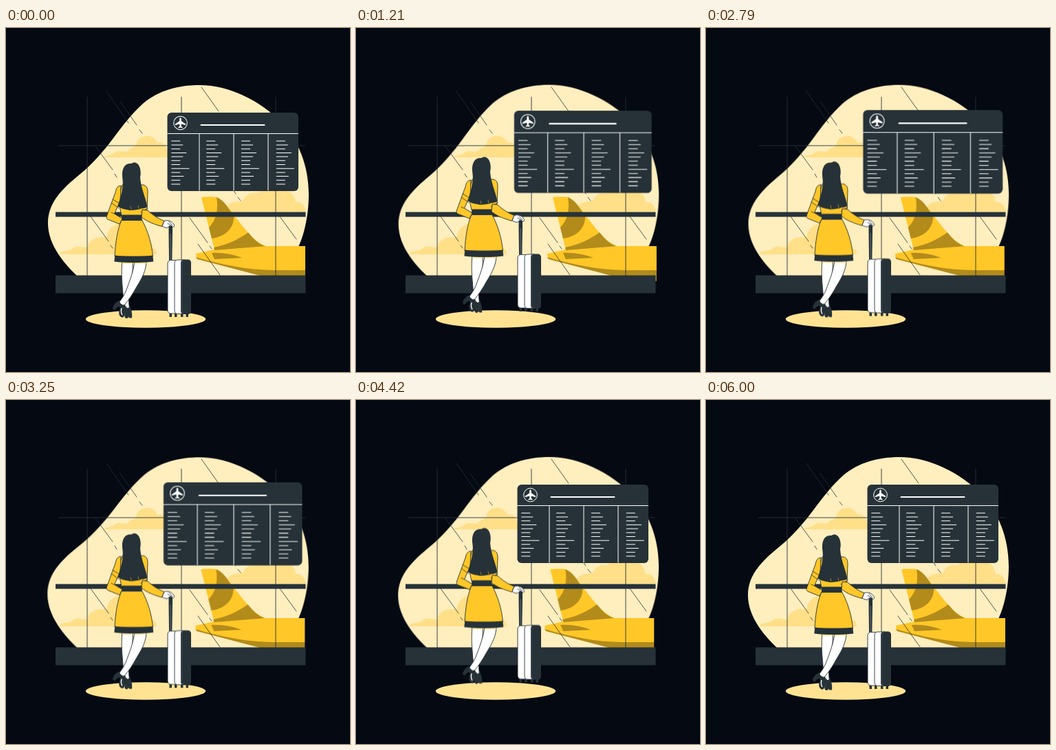
Recreate the animation shown at these times as an HTML page. Size 500 by 500 pixels, loop 6040 ms.

```html
<!DOCTYPE html>
<html lang="en">
<head>
<meta charset="utf-8">
<title>Airport hall</title>
<style>
  html, body { margin: 0; width: 100%; height: 100%; overflow: hidden; background: #050912; }
  svg { display: block; width: 100vw; height: 100vh; }

  .dark { fill: #263238; }
  .gold { fill: #ffc727; }
  .deep { fill: #b28b1b; }
  .cream { fill: #ffeebe; }
  .cloud { fill: #ffdf88; }
  .white { fill: #fff; }
  .line { fill: none; stroke: #263238; stroke-width: 1; }
  .thin { fill: none; stroke: #263238; stroke-width: .8; stroke-linecap: round; stroke-linejoin: round; }
  .edge { stroke: #263238; stroke-width: .9; stroke-linejoin: round; }
  .chalk { fill: none; stroke: #fff; }

  .blob, .plane, .board, .float { animation: 6.04s linear infinite; }
  .blob { animation-name: sway; transform-origin: 250px 225px; }
  .plane { animation-name: shake; }
  .board { animation-name: beat; transform-origin: 329.8px 180px; }
  .float { animation-name: bob; }

  /* 6 s of motion, then a 40 ms rest at the end of the loop */
  @keyframes sway {
    0%, 99.338%, 100% { transform: rotate(0deg); }
    6.209%, 31.043%, 55.877%, 80.712% { transform: rotate(1deg); }
    18.626%, 43.46%, 68.295%, 93.129% { transform: rotate(-1deg); }
  }
  @keyframes shake {
    0%, 99.338%, 100% { transform: translateX(0); }
    9.934%, 89.404% { transform: translateX(-1px); }
    19.868%, 79.47% { transform: translateX(2px); }
    29.801%, 49.669%, 69.536% { transform: translateX(-4px); }
    39.735%, 59.603% { transform: translateX(4px); }
  }
  @keyframes beat {
    0%, 29.801%, 39.735%, 59.603%, 100% { transform: scale(1); }
    9.934%, 49.669% { transform: scale(1.1); }
  }
  @keyframes bob {
    0%, 49.669%, 99.338%, 100% { transform: translateY(0); }
    24.834%, 74.503% { transform: translateY(-10px); }
  }
</style>
</head>
<body>
<svg viewBox="0 0 500 500">
  <path class="blob cream" d="M112 368C85 345 61 315 61 284C61 252 84 232 107 213C150 178 165 140 200 109C222 91 250 83 281 83C325 83 370 106 400 137C425 163 440 200 440 242C440 275 432 305 424 320C418 338 405 355 395 368Z"/>

  <g class="cloud">
    <path d="M141 188C149 183 153 186 158 181C164 176 171 181 177 179C181 172 188 176 190 167C194 154 215 153 220 167C228 164 234 170 236 188Z"/>
    <path d="M77 329C82 321 90 326 96 321C104 314 111 320 118 319C121 305 136 302 146 305C148 291 157 284 170 284C186 284 196 292 198 306C208 305 212 312 213 320C218 321 219 325 219 329Z"/>
    <path d="M310 267C312 260 320 263 325 256C331 251 339 254 345 250C349 240 359 239 366 240C372 233 390 232 398 238C408 233 419 239 421 253C430 252 434 258 436 267Z"/>
  </g>

  <g class="plane">
    <path class="gold" d="M284 246C292 245 300 245 307 246C318 251 326 266 336 278C348 293 360 310 377 317H435V368H400L277 335L276 328L303 322Z"/>
    <path class="deep" d="M306 246C318 251 323 262 331 273C332 290 320 303 299 306L295 290C306 279 309 262 306 246Z"/>
    <path class="deep" d="M352 297C360 307 367 314 377 317L303 323L302 319C322 315 339 307 352 297Z"/>
    <path class="deep" d="M276 333C310 343 350 352 390 352H435V368H400L278 336Z"/>
    <path class="deep" d="M299 327C314 326 330 329 343 334L303 336Z"/>
  </g>

  <path class="line" stroke-opacity=".9" d="M118 100V360M255 100V360M392 100V360M76 171H435"/>
  <path class="thin" d="M146 92L178 138M166 107L190 141M194 148L198 153M130 172L155 206M158 212L161 217M284 86L309 121M308 204L334 241M337 246L341 251M123 274L149 310M152 316L155 320M267 276L293 312M296 317L299 321M279 314L311 359M398 274L422 307"/>
  <path class="dark" d="M72 267.5H435.5V274.5H72ZM72 359.5H435.5V385.5H72Z"/>

  <g class="board">
    <rect class="dark" x="234.5" y="123" width="190.5" height="114" rx="6"/>
    <path class="chalk" d="M234.5 153.5H425M281 153.5V236.5M331 153.5V236.5M381 153.5V236.5"/>
    <path class="chalk" stroke-width="2" stroke-linecap="round" d="M283.5 141H375.5"/>
    <circle class="chalk" cx="253.5" cy="138" r="9.8"/>
    <path class="white" transform="translate(253.5 138)" d="M0 -8C1.5 -7 1.4 -5 1.4 -2.8L7.5 1.5V3.2L1.4 1.6L1 4.8L3 6.3V7.5L0 6.7L-3 7.5V6.3L-1 4.8L-1.4 1.6L-7.5 3.2V1.5L-1.4 -2.8C-1.4 -5 -1.5 -7 0 -8Z"/>
    <path id="rows" class="chalk"/>
  </g>

  <ellipse cx="203" cy="423" rx="87.2" ry="12.7" fill="#ffe393"/>

  <g class="float">
    <!-- suitcase -->
    <path class="dark" d="M236.5 288H242V298L241.3 338H237L236.5 298Z"/>
    <path d="M239.2 299V337" stroke="#7b858a" stroke-width=".8"/>
    <path class="dark" d="M237.5 413h3.5v7h-3.5zM245 413h3.5v7h-3.5zM254 413h3.5v7h-3.5zM261.5 413h3.5v7h-3.5z"/>
    <rect class="white edge" x="235" y="337.5" width="16" height="77.5" rx="4.5"/>
    <rect class="white edge" x="245" y="337" width="18" height="78.5" rx="4.5"/>
    <rect class="dark" x="254" y="336.5" width="15" height="79.5" rx="4.5"/>
    <path d="M258 337C255.5 339 255 341 255 345V408C255 412 256 414 258 415.5" fill="none" stroke="#6d777c" stroke-width=".5"/>

    <!-- legs and shoes -->
    <path class="white edge" d="M169 338C167 358 169 372 170 386C171 396 173 402 174 409L180 410C178 400 178 390 180 378C183 364 185 352 184 338Z"/>
    <path class="white edge" d="M187 338C186 352 179 370 174 383C171 390 168 394 164 399L171 404C178 396 184 387 190 376C198 363 204 352 204 338Z"/>
    <path d="M169 341.8H184M187 341.8H203.5" stroke="#ffe393" stroke-width="2"/>
    <path class="dark" d="M165 396C159 398 155 404 155 408L158 410C161 406 164 404 166 406C164 412 163 417 167 420C170 422 173 419 173 414C174 408 173 404 171 402C168 404 166 401 165 396Z"/>
    <path class="dark" d="M174 404C174 411 171 417 173 421C175 423 177 422 178 420L179.5 421.5H183C184 415 182 409 180 404C178 408 176 408 174 404Z"/>
    <path d="M168 407C167 411 167 414 169 417" fill="none" stroke="#fff" stroke-width="1.4"/>

    <!-- dress -->
    <path class="gold edge" d="M169 228H200C205 230 206 233 206 239L205 264L197 273H168L163 248Z"/>
    <path class="gold edge" d="M168 279H197.5C206 294 212 314 213.5 332H158C159 312 162 293 168 279Z"/>
    <path class="dark" d="M158.3 330.5C176 332.5 196 332.5 213.3 330.5L214.3 339.5C196 341.5 175 341.5 157.3 339.5Z"/>
    <path class="dark" d="M168.5 271.5H197L198 280H167.5Z"/>

    <!-- arms -->
    <path class="gold edge" d="M167 229C161 230 160 234 159 239L146.5 273C145.5 277 147 278 150 279L165 285L169 277L157.5 270L166 251Z"/>
    <path class="thin" d="M153 254L164 262M155 249L165 255M157 270L153 268M196 268L206 262"/>
    <path class="gold edge" d="M198 264L206 265C212 271 221 277 230 280.5L226.5 288.5C215 285 206 282 197 275Z"/>
    <path class="white edge" d="M230 280.5C236 278.5 241 281 244 285.5C245 288 244 290 242 289L240 287C237 287 236 290 234 290.5C231 290 229 289 227 288Z"/>
    <path class="thin" d="M237 281.5L242 287M235 284L240 287"/>

    <path class="dark" d="M169.5 220C167 204 173 196 182 197C191 191 198 203 195 217C196 233 203 246 205.5 260C201 263 197 261.5 194 263.5C187 264 183 266 178 264.5C172 264 167 262 162.5 259.5C166 246 171 234 169.5 220Z"/>
    <path d="M182 264L181 259M193 263L192 258" stroke="#ffc727" stroke-width=".5"/>
  </g>
</svg>
<script>
  // Timetable entries: four equal columns of short strokes
  const lengths = [13, 17, 13, 22, 17, 13, 13, 26, 13, 18, 13, 13];
  const column = x => lengths.map((w, i) => `M${x} ${164.3 + i * 5.7}h${w}`).join("");
  document.getElementById("rows").setAttribute("d", [240.3, 291.2, 342, 392.8].map(column).join(""));
</script>
</body>
</html>
```
